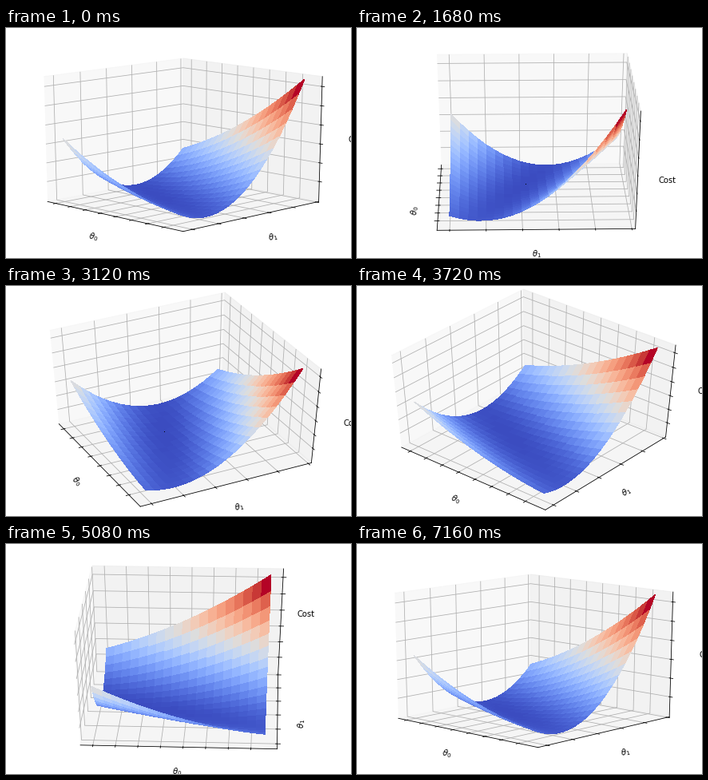
Recreate the animation shown at these times as a matplotlib script. Size 432 by 288 pixels, loop 7.2 s.

```python
import matplotlib.pyplot as plt
import numpy as np
from matplotlib.animation import FuncAnimation
from mpl_toolkits.mplot3d import Axes3D

FRAMES = 180
PAD = 1 / 48


class WideAxes(Axes3D):
    """3D axes stretched over the whole rectangle instead of a square."""

    def apply_aspect(self, position=None):
        pass


def cost(a, b):
    return 1 + 2.04 * (b + 0.5075 * a - 5.577) ** 2 + 0.125 * (a - 2.58) ** 2


def padded(values, margin):
    lo, hi = values.min(), values.max()
    m = (hi - lo) * margin
    lo, hi = lo - m, hi + m
    p = (hi - lo) * PAD
    return lo - p, hi + p


fig = plt.figure(figsize=(6, 4), dpi=72, facecolor="white")
ax = WideAxes(fig, [0, 0, 1, 1])
fig.add_axes(ax)
ax.set_box_aspect((1, 1, 1), zoom=3 ** 0.5 / 1.8294640721620434)

theta0 = np.linspace(0, 7.6, 20)
theta1 = np.linspace(0, 9.5, 20)
A, B = np.meshgrid(theta0, theta1)
J = cost(A, B)
ax.plot_surface(A, B, J, rstride=1, cstride=1, cmap="coolwarm",
                linewidth=0, antialiased=False)
best, = ax.plot([2.58], [4.27], [1], "k,", zorder=10)

ax.set_xlim(*padded(theta0, 0.05))
ax.set_ylim(*padded(theta1, 0.05))
ax.set_zlim(*padded(J, 0))
ax.set_xticks(np.arange(8))
ax.set_yticks(np.arange(0, 11, 2))
ax.set_zticks(np.arange(20, 121, 20))
for axis in (ax.xaxis, ax.yaxis, ax.zaxis):
    axis.set_ticklabels([])
ax.set_xlabel(r"$\theta_0$")
ax.set_ylabel(r"$\theta_1$")
ax.set_zlabel("Cost")


def update(i):
    t = 2 * np.pi * i / FRAMES
    azim = -45 + 44 * np.sin(t)
    ax.view_init(elev=30 - 15 * np.cos(t), azim=azim)
    best.set_visible(azim > -40)


anim = FuncAnimation(fig, update, frames=FRAMES, interval=40,
                     repeat=True, repeat_delay=0)
plt.show()
```
